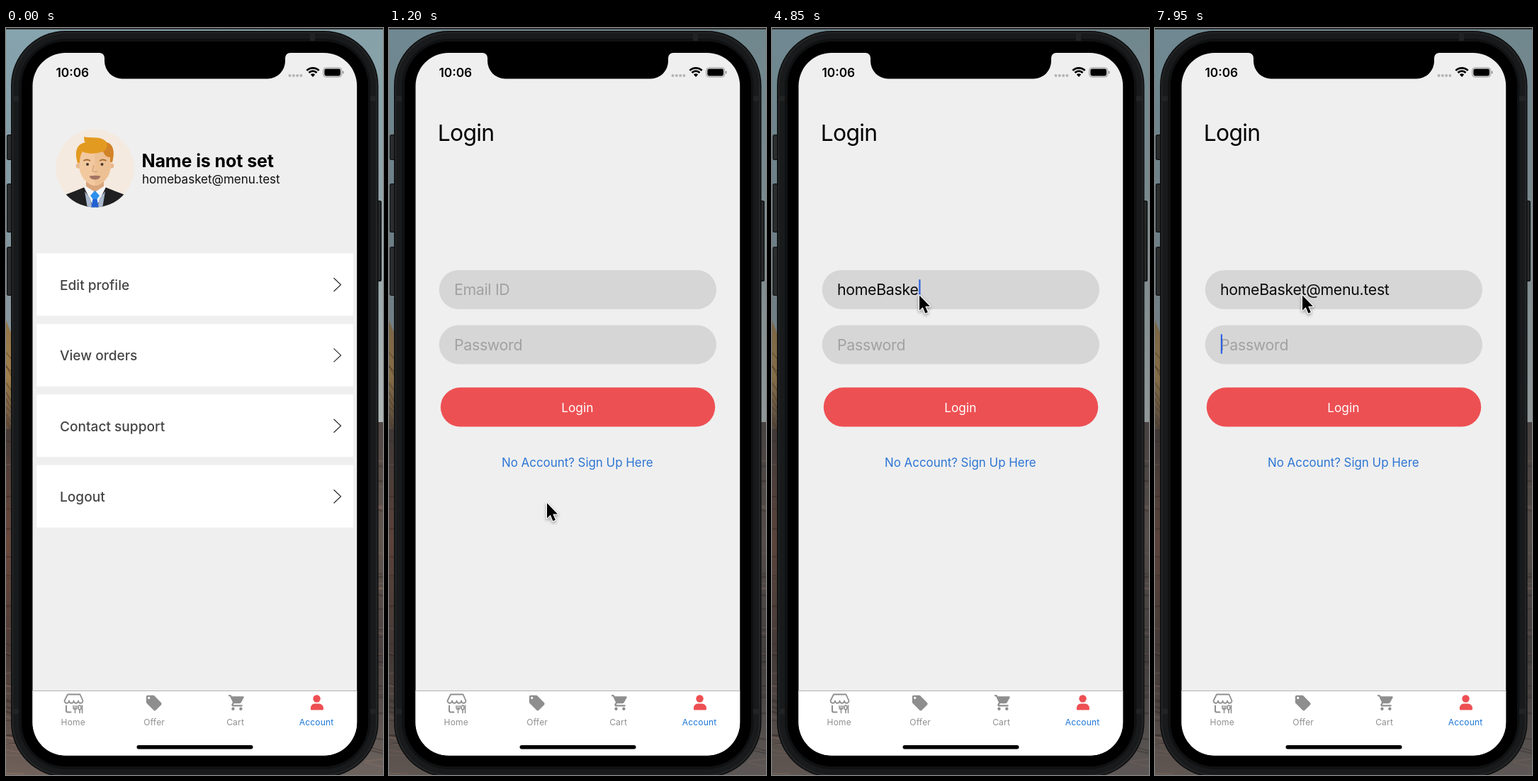
Write an HTML page with a canvas that moves like this. It is 532x1052 px and loops after 8 s.

```html
<!DOCTYPE html>
<html lang="en">
<head>
<meta charset="utf-8">
<title>Account and login</title>
<style>
  html, body { margin: 0; width: 100%; height: 100%; overflow: hidden; background: #000; }
  canvas { display: block; width: 532px; height: 1052px; }
</style>
</head>
<body>
<canvas id="stage" width="532" height="1052"></canvas>
<script>
const ctx = document.getElementById('stage').getContext('2d');
const LOOP = 8000, LOGIN_AT = 1100, FOCUS_AT = 2600, TAB_AT = 7800;
const EMAIL = 'homeBasket@menu.test';
const KEY_TIMES = [3250, 3450, 3600, 3800, 4150, 4400, 4550, 4700, 4850, 5050,
  6150, 6400, 6450, 6600, 6750, 6900, 7050, 7150, 7250, 7400];
// caret fades: start, end, opacity before and after
const FADES = [[2900, 3050, 1, 0], [3150, 3250, 0, 1], [3930, 4080, 1, 0], [4130, 4150, 0, 1],
  [5500, 5650, 1, 0], [5850, 6050, 0, 1], [7620, 7770, 1, 0], [7790, 7800, 0, 1]];
const GREY = '#8e8e8f', RED = '#ed5053', PAGE = '#efefef';

const clamp = v => Math.max(0, Math.min(1, v));
const lerp = (a, b, k) => a + (b - a) * k;

function box(x, y, w, h, r, fill) {
  ctx.beginPath();
  ctx.roundRect(x, y, w, h, r);
  ctx.fillStyle = fill;
  ctx.fill();
}

function disc(x, y, r, fill) {
  ctx.beginPath();
  ctx.arc(x, y, r, 0, 7);
  ctx.fillStyle = fill;
  ctx.fill();
}

function shape(d, fill) {
  ctx.fillStyle = fill;
  ctx.fill(new Path2D(d));
}

function line(d, color, width) {
  ctx.strokeStyle = color;
  ctx.lineWidth = width;
  ctx.stroke(new Path2D(d));
}

function setFont(size, weight = 400, spacing = 0) {
  ctx.font = `${weight} ${size}px Inter, "Open Sans", sans-serif`;
  ctx.letterSpacing = spacing + 'px';
}

function text(str, x, y, fill, size, weight, spacing, align = 'left') {
  setFont(size, weight, spacing);
  ctx.textAlign = align;
  ctx.fillStyle = fill;
  ctx.fillText(str, x, y);
}

function fade(y0, y1, stops) {
  const g = ctx.createLinearGradient(0, y0, 0, y1);
  stops.forEach((c, i) => g.addColorStop(i / (stops.length - 1), c));
  return g;
}

// Desert wallpaper, seen only in the narrow strips beside the phone
function wallpaper(dimmed) {
  box(0, 0, 266, 1052, 0, fade(0, 560, ['#86a4ae', '#8297a0', '#8c9699']));
  box(266, 0, 266, 1052, 0, fade(0, 560, ['#86a1a9', '#94a5a9', '#b0b7b7']));
  shape('M0 412L10 436V1052H0Z', fade(412, 570, ['#94764b', '#a07f4c', '#5d4b40']));
  ctx.fillStyle = fade(560, 1052, ['#453a37', '#69483c', '#4b3c37', '#70625b']);
  ctx.fillRect(0, 565, 266, 487);
  ctx.fillStyle = fade(555, 1052, ['#514744', '#625650', '#4a4240', '#6d645f']);
  ctx.fillRect(266, 555, 266, 497);
  let seed = 7;
  const rnd = () => (seed = (seed * 16807) % 2147483647) / 2147483647;
  for (let i = 0; i < 70; i++) {
    const x = i % 2 ? 506 : -4, y = 580 + rnd() * 472;
    line(`M${x} ${y}l30 ${rnd() * 14 - 4}`, rnd() < .5 ? '#2b1d1b55' : '#a07a6a40', 1 + rnd() * 2);
  }
  for (let i = 0; i < 10; i++) {
    line(`M0 ${430 + rnd() * 130}l9 ${8 + rnd() * 12}`, '#50361f77', 1.5);
  }
  if (dimmed) box(0, 0, 532, 1052, 0, '#2c34363d');
  box(0, 0, 532, 2, 0, '#2a2c2d');
}

function button(x, y, h) {
  box(x, y, 8.5, h, 2.5, '#0d0e0f');
  box(x + 1, y + 1, 6, h - 2, 2, '#2a2c2d');
}

function phone() {
  [[150, 36], [219, 69], [308, 69]].forEach(([y, h]) => button(1, y, h));
  button(521.5, 243, 114);
  box(7, 4, 518.5, 1051, 77, '#0d0e0f');
  box(8.5, 5.5, 515.5, 1048, 76, '#232526');
  box(10.5, 7.5, 511.5, 1044, 74, '#181a1b');
  box(18, 15, 496.5, 1029, 67, '#101112');
  ctx.fillStyle = '#212324';
  ctx.fillRect(429, 6, 7, 12);
  [96, 959].forEach(y => { ctx.fillRect(9, y, 9, 7); ctx.fillRect(514, y, 9, 7); });
  box(22, 19, 489, 1021, 62, '#000');
}

function statusBar() {
  shape('M130 34V35H132A7 7 0 0 1 139 42V46.5A25 25 0 0 0 164 71.5H369A25 25 0 0 0 394 46.5V42A7 7 0 0 1 401 35H403V34Z', '#000');
  text('10:06', 70.5, 69, '#000', 17.3, 600);
  for (let i = 0; i < 4; i++) disc(400.5 + i * 5.3, 67, 2, '#b4b4b4');
  ctx.strokeStyle = '#000';
  ctx.lineWidth = 2.8;
  for (const r of [12.2, 7.8]) {
    ctx.beginPath();
    ctx.arc(433, 68.5, r, -Math.PI * .75, -Math.PI * .25);
    ctx.stroke();
  }
  shape('M433 69L429.8 65.6Q433 62.8 436.2 65.6Z', '#000');
  ctx.beginPath();
  ctx.roundRect(447.7, 56, 26, 13, 3.8);
  ctx.strokeStyle = '#909090';
  ctx.lineWidth = 1;
  ctx.stroke();
  box(449.3, 57.6, 22.8, 9.8, 2.4, '#000');
  box(474.8, 60.5, 1.6, 4, 1, '#909090');
}

function icon(d, x, y) {
  ctx.save();
  ctx.translate(x, y);
  ctx.scale(1.09, 1.09);
  ctx.fillStyle = GREY;
  ctx.fill(new Path2D(d), 'evenodd');
  ctx.restore();
}

function shopIcon() {
  ctx.lineJoin = ctx.lineCap = 'round';
  line('M87 938.5H104.5L108.5 947.5a3.25 3.25 0 0 1-6.5 0a3.25 3.25 0 0 1-6.5 0a3.25 3.25 0 0 1-6.5 0a3.25 3.25 0 0 1-6.5 0Z', GREY, 1.8);
  line('M85 954.5V961.5Q85 963.5 87 963.5H91.5', GREY, 2);
  line('M95 954.5V957Q95 959.5 97.5 959.5Q100 959.5 100 957V954.5M97.5 954.5V964.5', GREY, 1.5);
  line('M104 960V964.5M107.5 954V964.5', GREY, 1.6);
  ctx.beginPath();
  ctx.ellipse(104, 957, 1.9, 3, 0, 0, 7);
  ctx.stroke();
  ctx.lineJoin = 'miter';
  ctx.lineCap = 'butt';
}

function tabBar() {
  ctx.fillStyle = '#fff';
  ctx.fillRect(37, 933, 459, 92);
  ctx.fillStyle = '#b2b2b2';
  ctx.fillRect(37, 933, 459, 1);
  shopIcon();
  icon('M21.4 11.6l-9-9Q11.9 2 11 2H4Q2 2 2 4V11Q2 11.9 2.6 12.4l9 9Q13 22.6 14.4 21.4l7-7Q22.6 13 21.4 11.6ZM5.5 4a1.5 1.5 0 1 0 .01 0Z', 195.7, 937.5);
  icon('M1 2V4H3L6.6 11.6L5.25 14C4.5 15.4 5.5 17 7 17H19V15H7.4Q7 15 7.2 14.6L8.1 13H15.55Q16.7 13 17.3 12L20.9 5.5Q21.5 4 20 4H5.2L4.3 2ZM7 18a2 2 0 1 0 .01 0ZM17 18a2 2 0 1 0 .01 0Z', 312.8, 937);
  disc(438.5, 944.5, 5.2, RED);
  shape('M429.8 959Q429.8 951.5 436 951.5H441Q448 951.5 448 959Q448 960.5 446.5 960.5H431.3Q429.8 960.5 429.8 959Z', RED);
  ['Home', 'Offer', 'Cart', 'Account'].forEach((name, i) =>
    text(name, 94.8 + i * 114.4, 981.5, i === 3 ? '#1b75d6' : GREY, 12, 400, .2, 'center'));
  box(184.5, 1010, 164, 5.5, 2.75, '#000');
}

function avatar() {
  ctx.save();
  ctx.beginPath();
  ctx.arc(125.5, 197.5, 55, 0, 7);
  ctx.clip();
  ctx.fillStyle = '#f4eae0';
  ctx.fillRect(70, 142, 112, 112);
  shape('M78 254L83 235Q97 230 110 224.5H141Q154 230 168 235L173 254Z', '#202022');
  shape('M110 224L125.5 256L141 224L135 219H116Z', '#f5f7fa');
  shape('M113 208H138V223L125.5 231L113 223Z', '#d9a57c');
  shape('M111 230L119 240L122 254H115ZM140 230L132 240L129 254H136Z', '#a9b8cd');
  shape('M125.5 229L132 236L128.5 241H122.5L119 236Z', '#2c91ed');
  shape('M122.5 241H128.5L131.5 256H119.5Z', '#2161d4');
  disc(102.5, 194, 3.8, '#e8b88d');
  disc(148.5, 194, 3.8, '#e8b88d');
  shape('M103.5 172H147.5V196C147.5 209 135 222 125.5 222C116 222 103.5 209 103.5 196Z', '#f2c99f');
  shape('M125.5 172H147.5V196C147.5 209 135 222 125.5 222Z', '#edc093');
  shape('M101 190C97 176 98 164 112 161C109 158 111 155 110 153C118 156 135 151 142 161C153 164 153 177 150 189H147V182C141 182 139 178 137 174C128 177 115 178 108 174C106 177 104 182 104 190Z', '#e39a20');
  shape('M142 161C153 164 153 177 150 189H147V182C141 182 139 178 137 174C142 171 144 166 142 161Z', '#d28328');
  line('M109.5 187Q114 184 119 187M132 187Q137 184 141.5 187', '#a26a34', 2);
  disc(115, 192, 2, '#493730');
  disc(135.5, 192, 2, '#493730');
  line('M124 193L122 201.5Q125.5 204 129 201.5', '#d6a076', 1.4);
  shape('M117.5 208.5Q125.5 207 133.5 208.5Q132 213.5 125.5 213.5Q119 213.5 117.5 208.5Z', '#a47464');
  ctx.restore();
}

function accountPage() {
  avatar();
  text('Name is not set', 191.5, 195.5, '#000', 25, 700, -.1);
  text(EMAIL.toLowerCase(), 192, 219, '#111', 17);
  ['Edit profile', 'View orders', 'Contact support', 'Logout'].forEach((label, i) => {
    const y = 317.3 + i * 99.4;
    box(43.3, y, 446.7, 88, 1, '#fff');
    text(label, 76, y + 51.7, '#464646', 19.1, 500);
    line(`M462.5 ${y + 34.7}L472.5 ${y + 44.2}L462.5 ${y + 53.7}`, '#2c2c2c', 1.2);
  });
}

function caretAlpha(t) {
  let a = t >= FOCUS_AT ? 1 : 0;
  for (const [from, to, a0, a1] of FADES) {
    if (t >= from) a = lerp(a0, a1, clamp((t - from) / (to - from)));
  }
  return a;
}

function field(y, value, hint) {
  box(70.7, y, 391.3, 55, 27.5, '#d6d6d6');
  text(value || hint, 92, y + 35.3, value ? '#0a0a0a' : '#a1a1a1', 21.3, 400, -.3);
}

function loginPage(t) {
  const typed = EMAIL.slice(0, KEY_TIMES.filter(k => t >= k).length);
  text('Login', 68.8, 159, '#000', 31.8, 400, -.7);
  field(341, typed, 'Email ID');
  field(418.4, '', 'Password');
  const onPassword = t >= TAB_AT;
  setFont(21.3, 400, -.3);
  const x = 92.8 + (onPassword ? 0 : ctx.measureText(typed).width);
  ctx.globalAlpha = caretAlpha(t);
  box(x, onPassword ? 431 : 354, 2.2, 28, 1, '#2b62e3');
  ctx.globalAlpha = 1;
  box(72.8, 506.3, 387.4, 55.2, 27.6, RED);
  text('Login', 265.8, 540.5, '#fff', 17.3, 400, 0, 'center');
  text('No Account? Sign Up Here', 265.8, 617.6, '#2d75d4', 16.9, 400, 0, 'center');
}

function cursor(t) {
  if (t < 50) return;
  const enter = 1 - (1 - clamp((t - 50) / 800)) ** 3;
  const k = clamp((t - 1600) / 700), move = k * k * (3 - 2 * k);
  const x = lerp(lerp(540, 223, enter), 208, move);
  const y = lerp(lerp(790, 669, enter), 376.5, move);
  const arrow = new Path2D('M0 0V23.5L5.3 18.6L9.3 28L13.2 26.3L9.2 17.1H16.6Z');
  ctx.save();
  ctx.translate(x, y);
  ctx.scale(.9, .9);
  ctx.lineJoin = 'round';
  ctx.shadowColor = '#0006';
  ctx.shadowBlur = 4;
  ctx.shadowOffsetY = 2;
  ctx.strokeStyle = '#fff';
  ctx.lineWidth = 2.6;
  ctx.stroke(arrow);
  ctx.shadowColor = 'transparent';
  ctx.fillStyle = '#000';
  ctx.fill(arrow);
  ctx.restore();
}

function draw(t) {
  const loggedOut = t >= LOGIN_AT;
  wallpaper(loggedOut);
  phone();
  ctx.save();
  ctx.beginPath();
  ctx.roundRect(37.5, 35, 457.7, 989.5, 46.5);
  ctx.clip();
  ctx.fillStyle = PAGE;
  ctx.fillRect(37, 34, 460, 992);
  if (loggedOut) loginPage(t); else accountPage();
  tabBar();
  statusBar();
  ctx.restore();
  cursor(t);
}

const start = performance.now();
function tick() {
  draw((performance.now() - start) % LOOP);
  requestAnimationFrame(tick);
}
tick();
</script>
</body>
</html>
```
